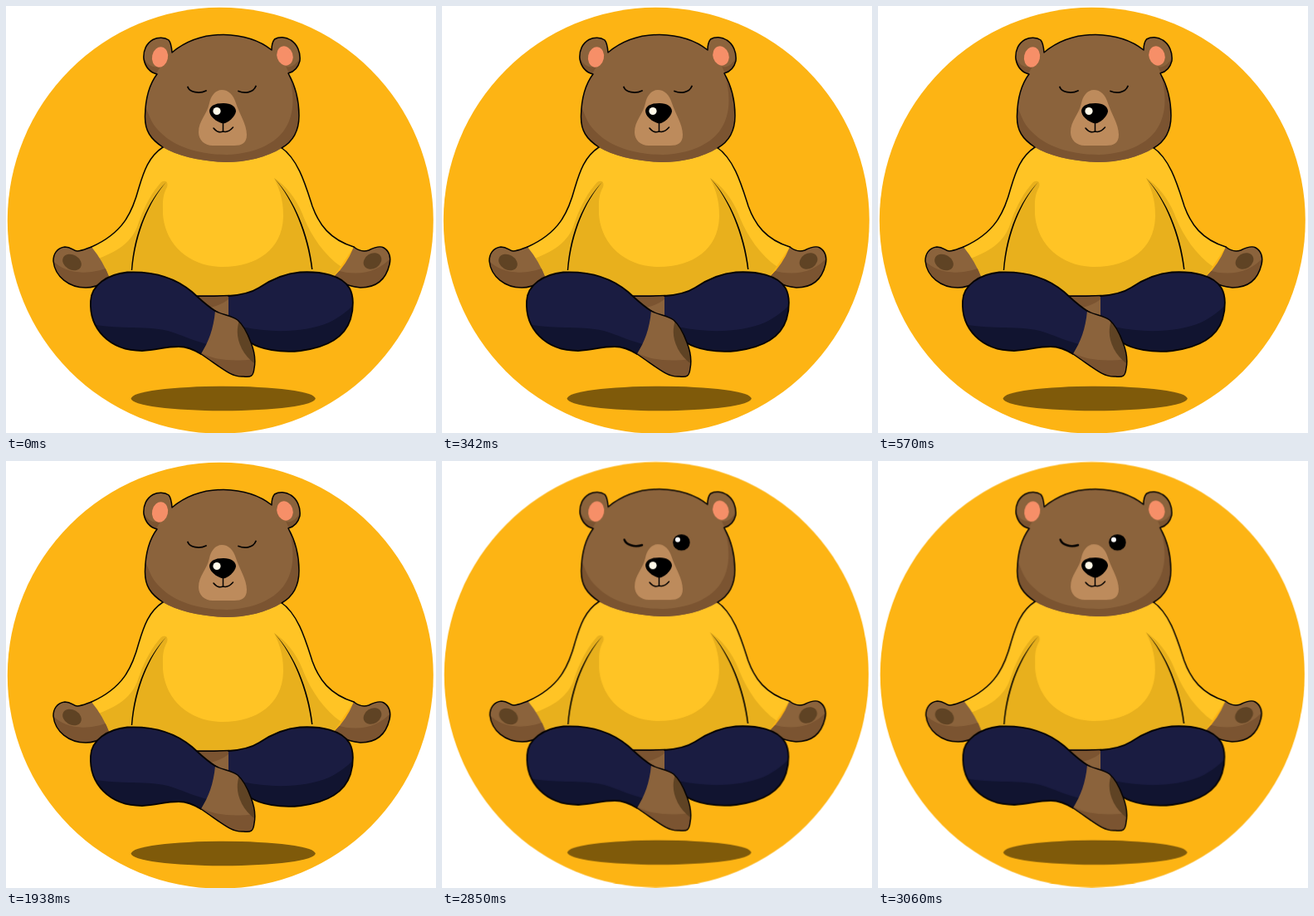
An HTML page for the animation above (3200 ms loop, 518 by 514 pixels).

```html
<!DOCTYPE html>
<html lang="en">
<head>
<meta charset="utf-8">
<title>Meditating bear</title>
<style>
html, body { margin: 0; width: 100%; height: 100%; overflow: hidden; background: #fff; }
svg { display: block; width: 518px; height: 514px; }
.fur { fill: #8b633c; }
.fur-shade { fill: #7b5431; }
.fur-dark { fill: #5f4324; }
.knit { fill: #ffc425; }
.knit-shade { fill: #e8b01d; }
.navy { fill: #1a1c41; }
.navy-shade { fill: #111430; }
.line { fill: none; stroke: #050302; stroke-width: 1.5; stroke-linecap: round; stroke-linejoin: round; }
.bold { stroke-width: 1.8; }
.lid { stroke-width: 2.5; }
#scene { transform-origin: 258px 257px; animation: settle 3200ms step-end infinite; }
#closed { animation: rest 3200ms step-end infinite; }
#wink { visibility: hidden; animation: wink 3200ms step-end infinite; }
@keyframes settle {
  0% { transform: none; }
  89.0625%, 100% { transform: translateY(-1px) scale(.9968, .9985); }
}
@keyframes rest {
  0% { visibility: visible; }
  89.0625%, 100% { visibility: hidden; }
}
@keyframes wink {
  0% { visibility: hidden; }
  89.0625%, 100% { visibility: visible; }
}
</style>
</head>
<body>
<svg viewBox="0 0 518 514">
  <defs>
    <path id="head" d="M201 55C218 41 240 34.500 262 34.500C285 35 305 41 321 53C331 61 337 70 341 82C348 95 353 112 353 132C353 150 346 163 332 171C314 182 290 188 264 188C236 187 207 181 189 170C174 160 167 150 167.500 132C168 112 172 95 181 82C186 72 192 63 201 55Z"/>
    <path id="earL" d="M200 56C199.500 49 198.500 44 196 41C191 37.500 183 37.500 177 40.500C169 45 165 54 166 64C168 74 174 80 182 82L200 80Z"/>
    <path id="earR" d="M320 53C320 48 321 43 323.500 40C329 36.500 337 37 343 41C351 46 355 56 354 66C352 74 348 79 340 81L322 75Z"/>
    <path id="sweater" d="M189 170C172 181 166 199 160 219C152 249 141 273 103 290L125 327L150 340L230 350L268 349L369 340L394 327L419 290C390 281 377 263 369 241C361 216 352 184 331 170Z"/>
    <path id="handL" d="M103 290C97 292 91 295 86 295C81 295 79 290 71 290C61 291 57 299 57 307C59 326 76 339 96 339C107 339 117 335 125 328Q117 307 103 290Z"/>
    <path id="handR" d="M419 290C424 294 431 296 437 294C443 291 450 288 455 291C462 295 464 303 462 311C458 328 447 339 427 339C413 338 403 333 394 327Q410 312 419 290Z"/>
    <path id="legL" d="M102 355C103 336 122 323 146 320.500C179 319 205 328 224 344C233 352 242 361 252 367L252 390L235 419C227 414 219 410 208 410C191 410 183 414 164 415C124 415 100 388 102 355Z"/>
    <path id="legR" d="M268 348.500C282 348 294 346 305 339C320 329 335 322 354 320.500C379 319 405 324 414 340C419 349 419 364 415 377C408 399 386 411 355 415C331 418 306 413 294 405L268 373Z"/>
    <path id="foot" d="M252 367C261 372 271 372 279 378C287 385 291 394 295 405C299 415 301 426 299 436C298 446 295 447 286 446C272 447 263 438 235 419C244 404 250 389 252 367Z"/>
    <clipPath id="inHead"><use href="#head"/></clipPath>
    <clipPath id="inSweater"><use href="#sweater"/></clipPath>
    <clipPath id="inHandL"><use href="#handL"/></clipPath>
    <clipPath id="inHandR"><use href="#handR"/></clipPath>
    <clipPath id="inLegL"><use href="#legL"/></clipPath>
    <clipPath id="inLegR"><use href="#legR"/></clipPath>
    <clipPath id="inFoot"><use href="#foot"/></clipPath>
  </defs>

  <g id="scene">
    <circle cx="258.300" cy="258.300" r="256.500" fill="#fdb414"/>
    <ellipse cx="261.700" cy="472.500" rx="111" ry="14.700" fill="#7f5a0a"/>

    <!-- sweater -->
    <use href="#sweater" class="knit"/>
    <g clip-path="url(#inSweater)" class="knit-shade">
      <path d="M100 308C128 299 149 288 158 266C165 244 175 225 187 212C192 209 196 212 194 218C188 229 189 237 189 250C191 286 220 314 261 314C304 314 334 291 334 252C334 232 329 220 323 207C338 217 349 231 357 250C366 274 382 299 404 314L400 350H120Z"/>
    </g>
    <path class="line" d="M189 170C172 181 166 199 160 219C152 249 141 273 103 290M331 170C352 184 361 216 369 241C377 263 390 281 419 290"/>
    <path d="M193 212C172 236 156 274 152.200 318H150.800C154 274 170 236 193 212ZM323 207C348 233 365 276 369.500 317H368C363 276 346 233 323 207Z"/>

    <!-- hands -->
    <use href="#handL" class="fur"/>
    <path clip-path="url(#inHandL)" class="fur-shade" d="M56 306C69 321 96 326 125 314V345H50Z"/>
    <ellipse class="fur-dark" cx="79.500" cy="308.500" rx="12" ry="9" transform="rotate(30 79.500 308.500)"/>
    <path class="line" d="M103 290C97 292 91 295 86 295C81 295 79 290 71 290C61 291 57 299 57 307C59 326 76 339 96 339C105 339 113 336 120 332"/>
    <use href="#handR" class="fur"/>
    <path clip-path="url(#inHandR)" class="fur-shade" d="M398 318C427 327 452 318 464 302V345H390Z"/>
    <ellipse class="fur-dark" cx="441.500" cy="307" rx="11.500" ry="9" transform="rotate(-32 441.500 307)"/>
    <path class="line" d="M419 290C424 294 431 296 437 294C443 291 450 288 455 291C462 295 464 303 462 311C458 328 447 339 427 339C417 338 408 335 400 331"/>

    <!-- legs -->
    <path class="fur-shade" d="M229 348H269V375L251 367Z"/>
    <path class="fur" d="M246 363C255 361 262 358 269 352V374L252 368Z"/>
    <path class="line" d="M229 349.300C243 349.500 256 349 269 348.500"/>
    <use href="#legL" class="navy"/>
    <path clip-path="url(#inLegL)" class="navy-shade" d="M100 382C130 390 165 384 195 391C212 396 228 404 246 408L240 422H100Z"/>
    <path class="line bold" d="M235 419C227 414 219 410 208 410C191 410 183 414 164 415C124 415 100 388 102 355C103 336 122 323 146 320.500C179 319 205 328 224 344C233 352 242 361 252 367"/>
    <use href="#legR" class="navy"/>
    <path clip-path="url(#inLegR)" class="navy-shade" d="M284 386C320 394 360 393 389 381C403 374 413 366 421 357V420H290Z"/>
    <path class="line bold" d="M268 349C282 348 294 346 305 339C320 329 335 322 354 320.500C379 319 405 324 414 340C419 349 419 364 415 377C408 399 386 411 355 415C331 418 306 413 294 405"/>
    <use href="#foot" class="fur"/>
    <g clip-path="url(#inFoot)">
      <path class="fur-shade" d="M234 417C252 427 273 428 302 425V450H260Z"/>
      <path class="fur-dark" d="M281 379C275 395 281 417 300 431L304 405Z"/>
    </g>
    <path class="line" d="M252 367C261 372 271 372 279 378C287 385 291 394 295 405C299 415 301 426 299 436C298 446 295 447 286 446C272 447 263 438 235 419"/>

    <!-- head -->
    <use href="#earL" class="fur"/>
    <path class="fur-shade" d="M166 62C170 72 179 76 187 72L182 82C173 80 167 73 166 62Z"/>
    <use href="#earR" class="fur"/>
    <path class="fur-shade" d="M354 62C350 71 342 76 335 72L340 81C349 79 354 73 354 62Z"/>
    <use href="#head" class="fur"/>
    <path clip-path="url(#inHead)" class="fur-shade" d="M165 117C173 128 172 140 187 153C206 172 239 179 266 179C296 178 321 168 334 151C346 135 349 113 341 82L360 85V195H160Z"/>
    <ellipse cx="185.500" cy="61.500" rx="9.500" ry="12.300" fill="#f68f68" transform="rotate(12 185.500 61.500)"/>
    <ellipse cx="336" cy="60" rx="9.500" ry="11.800" fill="#f68f68" transform="rotate(-18 336 60)"/>
    <path class="line" d="M189 170C174 160 167 150 167.500 132C168 112 172 95 182 82C174 80 168 74 166 64C165 54 169 45 177 40.500C183 37.500 191 37.500 196 41C198.500 44 199.500 49 200 56C218 41 240 34.500 262 34.500C285 35 305 41 320 53C320 48 321 43 323.500 40C329 36.500 337 37 343 41C351 46 355 56 354 66C352 74 348 79 340 81C348 95 353 112 353 132C353 150 346 163 332 171"/>

    <!-- face -->
    <path fill="#bd8b5c" d="M232 152C232 138 242 131 245 117C247 107 253 101 260 101C268 101 274 107 277 117C281 130 290 142 290 155C290 165 284 168 275 168H249C239 168 232 161 232 152Z"/>
    <path d="M245 126C246 119 254 117 262 117C271 117 277 121 277 127C276 133 268 141 261.500 141.500C254 140 245 133 245 126Z"/>
    <circle cx="254" cy="126.500" r="4.600" fill="#fff9e8"/>
    <path class="line" d="M261.500 140V151M250 147C254 152 258 152.500 261.500 151C266 152.500 270 150 273.500 146"/>
    <path id="closed" class="line bold" d="M219 97.500C221 104 233 106 241 102M280 102.500C288 106 298 104 301 96.500"/>
    <g id="wink">
      <path class="line lid" d="M219.500 95.500C222 102 232 105 241 102"/>
      <ellipse cx="288.500" cy="98.700" rx="10.300" ry="9.800"/>
      <circle cx="284" cy="95.500" r="3" fill="#fff"/>
    </g>
  </g>
</svg>
</body>
</html>
```
